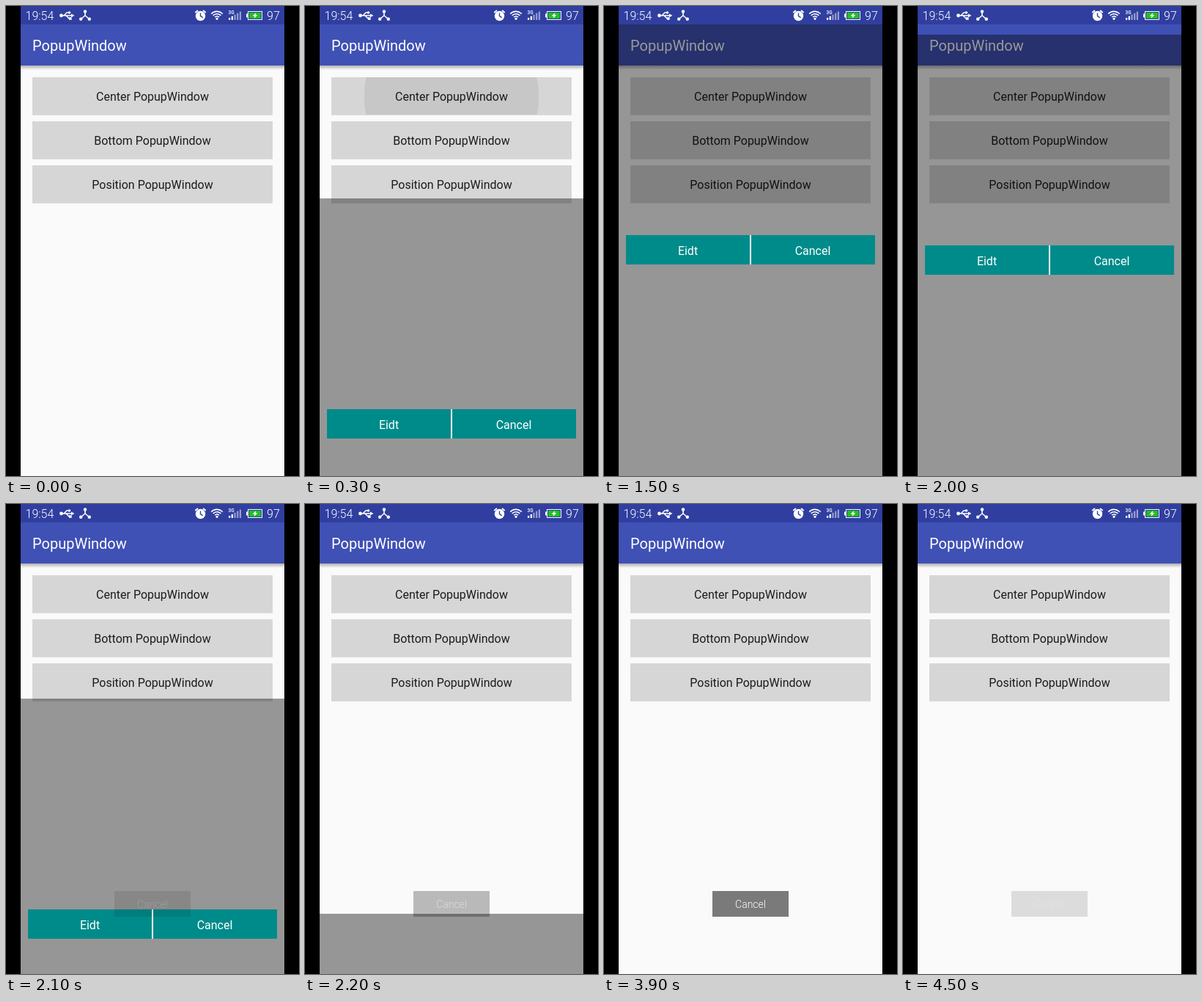
Animation, 400 px wide and 640 px high, one loop 4600 ms. Source, as an HTML page with a canvas:

```html
<!DOCTYPE html>
<html lang="en">
<head>
<meta charset="utf-8">
<title>PopupWindow</title>
<style>
  html, body { margin: 0; width: 100%; height: 100%; overflow: hidden; background: #000; }
  canvas { display: block; width: 400px; height: 640px; }
</style>
</head>
<body>
<canvas id="stage" width="400" height="640"></canvas>
<script>
const ctx = document.getElementById('stage').getContext('2d');
const LOOP = 4600;
const TOP = 26, BOTTOM = 640, PAGE = BOTTOM - TOP;
const BUTTONS = ['Center PopupWindow', 'Bottom PopupWindow', 'Position PopupWindow'];

const progress = (t, start, length) => Math.min(1, Math.max(0, (t - start) / length));
const easeInOut = p => (1 - Math.cos(Math.PI * p)) / 2;

function rect(x, y, w, h, color) {
  ctx.fillStyle = color;
  ctx.fillRect(x, y, w, h);
}

function label(str, x, y, size, color, align = 'center', weight = 400) {
  ctx.font = `${weight} ${size}px Roboto, sans-serif`;
  ctx.textAlign = align;
  ctx.fillStyle = color;
  ctx.fillText(str, x, y);
}

function dot(x, y, r) {
  ctx.beginPath();
  ctx.arc(x, y, r, 0, Math.PI * 2);
  ctx.fill();
}

// Each path is a flat list: x, y, x, y, ...
function lines(width, color, ...paths) {
  ctx.lineWidth = width;
  ctx.strokeStyle = color;
  ctx.beginPath();
  for (const p of paths) {
    ctx.moveTo(p[0], p[1]);
    for (let i = 2; i < p.length; i += 2) ctx.lineTo(p[i], p[i + 1]);
  }
  ctx.stroke();
}

function usbIcon() {
  lines(1.5, '#fff', [76, 13, 90, 13], [79, 13, 83, 9, 86, 9], [82, 13, 86, 17, 88, 17]);
  ctx.fillStyle = '#fff';
  dot(75.5, 13, 2.4);
  dot(86.5, 9, 1.8);
  ctx.fillRect(86, 15.3, 3.6, 3.6);
  ctx.beginPath();
  ctx.moveTo(89, 10.4);
  ctx.lineTo(93.5, 13);
  ctx.lineTo(89, 15.6);
  ctx.fill();
}

function hubIcon() {
  lines(1.6, '#fff', [108, 7, 108, 13, 102, 18], [108, 13, 114, 18]);
  ctx.fillStyle = '#fff';
  dot(108, 7.5, 2.2);
  dot(102.2, 17.8, 2.2);
  dot(113.8, 17.8, 2.2);
}

function alarmIcon() {
  ctx.fillStyle = '#fff';
  dot(265.5, 13.5, 6.7);
  lines(2, '#fff', [258.3, 9, 262, 6], [269, 6, 272.7, 9]);
  lines(1.4, '#303f9f', [265.5, 9.5, 265.5, 13.7, 268.7, 15.8]);
}

function wifiIcon() {
  ctx.strokeStyle = '#fff';
  ctx.lineWidth = 1.6;
  for (const r of [4, 7.3, 10.6]) {
    ctx.beginPath();
    ctx.arc(288, 18, r, -Math.PI * 0.76, -Math.PI * 0.24);
    ctx.stroke();
  }
  ctx.fillStyle = '#fff';
  dot(288, 17.3, 1.6);
}

function signalIcon() {
  label('3G', 303.5, 11, 6.5, '#fff', 'left', 500);
  for (let i = 0; i < 5; i++) {
    const h = 3 + i * 2.1;
    rect(304 + i * 3.7, 19 - h, 2.2, h, i < 2 ? '#fff' : 'rgba(255,255,255,.5)');
  }
}

function batteryIcon() {
  ctx.lineWidth = 1;
  ctx.strokeStyle = '#fff';
  ctx.strokeRect(330.5, 7.5, 19, 11);
  rect(328, 10.5, 2, 5, '#fff');
  rect(332, 9, 16, 8, '#20c020');
  ctx.fillStyle = '#fff';
  ctx.beginPath();
  ctx.moveTo(341.5, 9);
  ctx.lineTo(336.5, 13.7);
  ctx.lineTo(339.5, 13.7);
  ctx.lineTo(338.5, 17);
  ctx.lineTo(343.5, 12.3);
  ctx.lineTo(340.5, 12.3);
  ctx.fill();
}

function statusBar() {
  rect(20, 0, 360, TOP - 1, '#303f9f');
  label('19:54', 26.5, 19, 16, '#fff', 'left', 300);
  usbIcon();
  hubIcon();
  alarmIcon();
  wifiIcon();
  signalIcon();
  batteryIcon();
  label('97', 356, 19, 16, '#fff', 'left', 300);
}

function page() {
  rect(20, 0, 360, BOTTOM, '#fafafa');
  const shade = ctx.createLinearGradient(0, 81, 0, 87);
  shade.addColorStop(0, 'rgba(0,0,0,.3)');
  shade.addColorStop(1, 'rgba(0,0,0,0)');
  rect(20, 81, 360, 6, shade);
  rect(20, TOP - 1, 360, 56, '#3f51b5');
  label('PopupWindow', 36, 61, 20, '#fff', 'left');
  BUTTONS.forEach((name, i) => {
    const y = 97 + i * 60;
    rect(36, y + 51, 328, 1, '#e0e0e0');
    rect(36, y, 328, 51, '#d6d6d6');
    label(name, 200, y + 31.5, 16, '#1c1c1c');
  });
}

function ripple(t) {
  const grow = progress(t, 60, 340);
  const fade = 1 - progress(t, 300, 350);
  if (!grow || !fade) return;
  ctx.save();
  ctx.beginPath();
  ctx.rect(36, 97, 328, 51);
  ctx.clip();
  ctx.fillStyle = `rgba(0,0,0,${0.07 * fade})`;
  dot(200, 123, 20 + 140 * grow);
  ctx.restore();
}

// The dimmed window slides up with its two actions, then back down.
function popup(t) {
  const shown = easeInOut(progress(t, 129, 300)) - easeInOut(progress(t, 1972, 300));
  if (shown <= 0) return;
  const dy = Math.round((1 - shown) * PAGE);
  rect(20, TOP - 1 + dy, 360, PAGE + 1, 'rgba(0,0,0,.4)');
  rect(30, 312 + dy, 340, 40, '#008b8b');
  rect(199, 312 + dy, 2, 40, '#fff');
  label('Eidt', 114.5, 338.5 + dy, 16, '#fff');
  label('Cancel', 285, 338.5 + dy, 16, '#fff');
}

function toast(t) {
  const enter = progress(t, 2050, 500);
  const leave = progress(t, 4064, 500);
  const alpha = enter * (2 - enter) - leave * leave;
  if (alpha <= 0) return;
  ctx.globalAlpha = alpha;
  rect(148, 527, 104, 35, 'rgba(0,0,0,.51)');
  label('Cancel', 200, 550, 14, '#fff', 'center', 300);
  ctx.globalAlpha = 1;
}

function draw(t) {
  rect(0, 0, 400, 640, '#000');
  ctx.save();
  ctx.beginPath();
  ctx.rect(20, 0, 360, 640);
  ctx.clip();
  page();
  ripple(t);
  popup(t);
  statusBar();
  toast(t);
  ctx.restore();
}

const start = performance.now();
function tick() {
  draw((performance.now() - start) % LOOP);
  requestAnimationFrame(tick);
}
tick();
</script>
</body>
</html>
```
